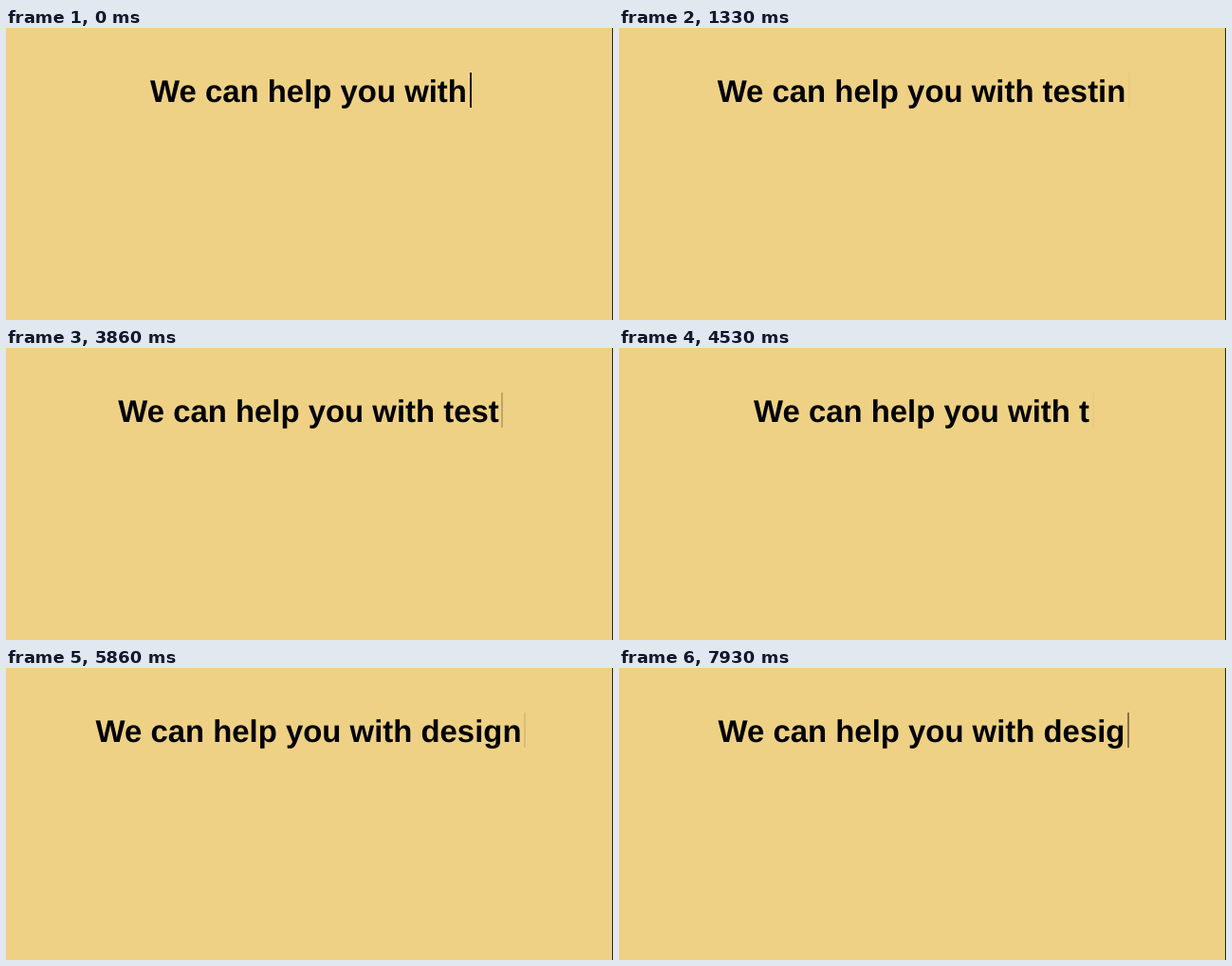
These frames come from a looping animation (640x308 px, 8000 ms). An HTML page:

```html
<!DOCTYPE html>
<html lang="en">
<head>
<meta charset="utf-8">
<title>Typewriter headline</title>
<style>
  html, body {
    margin: 0;
    width: 100%;
    height: 100%;
    overflow: hidden;
    background: #eed185;
  }
  .stage {
    position: relative;
    box-sizing: border-box;
    width: 640px;
    height: 308px;
    overflow: hidden;
    border-right: 1px solid #26231a;
  }
  h1 {
    position: absolute;
    left: 0;
    top: 47px;
    width: 642.7px;
    margin: 0;
    font: bold 32.9px/37px "Liberation Sans", Arial, sans-serif;
    color: #000;
    text-align: center;
    white-space: nowrap;
    text-rendering: geometricPrecision;
  }
  .text {
    position: relative;
    top: 1px;
  }
  .caret {
    display: inline-block;
    width: 2px;
    height: 37px;
    margin-left: 2.7px;
    vertical-align: top;
    background: #000;
  }
</style>
</head>
<body>
<div class="stage"><h1><span class="text"></span><span class="caret"></span></h1></div>
<script>
  const LOOP = 8000;
  const TICK = 1000 / 15;
  const KEY = 202; // ms per typed or erased letter
  const LEAD = 'We can help you with';
  const words = [
    { word: 'testing', type: 11, erase: 3435 },
    { word: 'design', type: 4647, erase: 7869 }
  ];

  const text = document.querySelector('.text');
  const blink = document.querySelector('.caret').animate(
    { opacity: [1, 0] },
    {
      duration: 400,
      iterations: Infinity,
      direction: 'alternate',
      easing: 'cubic-bezier(.25, .1, .1, 1)'
    }
  );
  blink.pause();

  const keys = (t, from) => Math.max(0, Math.floor((t - from) / KEY));

  function lineAt(t) {
    const { word, type, erase } = t < words[1].type ? words[0] : words[1];
    const count = t < erase
      ? Math.min(word.length, keys(t, type))
      : Math.max(0, word.length - 1 - keys(t, erase));
    return count ? LEAD + ' ' + word.slice(0, count) : LEAD;
  }

  function draw(now) {
    const t = Math.floor((now % LOOP + 7) / TICK) * TICK % LOOP;
    const line = lineAt(t);
    if (text.textContent !== line) text.textContent = line;
    blink.currentTime = t + 763;
  }

  const start = performance.now();
  function loop() {
    draw(performance.now() - start);
    requestAnimationFrame(loop);
  }
  loop();
</script>
</body>
</html>
```
